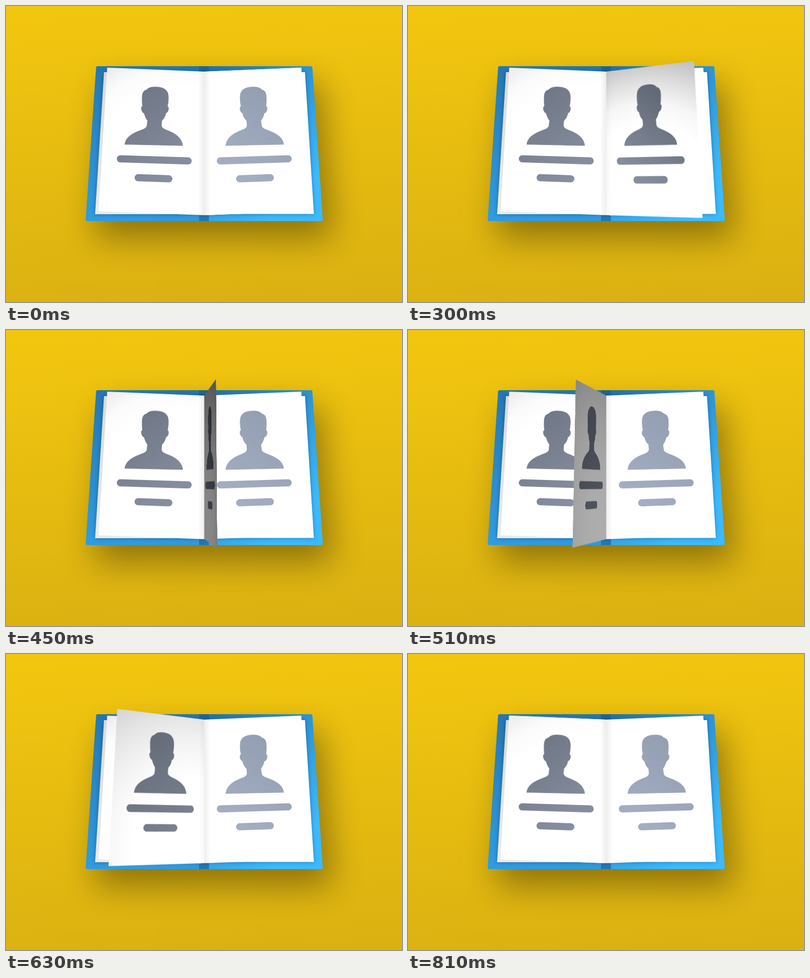
Recreate the animation shown at these times as an HTML page. Size 800 by 600 pixels, loop 0.84 s.

```html
<!DOCTYPE html>
<html lang="en">
<head>
<meta charset="utf-8">
<title>Page turn</title>
<style>
  html, body { margin: 0; width: 100%; height: 100%; overflow: hidden; }
  #stage {
    position: relative; width: 800px; height: 600px; overflow: hidden;
    background: linear-gradient(177deg, #f2c60f 3%, #dab111 97%);
    perspective: 1340px; perspective-origin: 400.5px 276px;
  }
  svg { position: absolute; left: 0; top: 0; width: 800px; height: 600px; overflow: visible; }
  #flip { transform-origin: 400.5px 276px; }
</style>
</head>
<body>
<div id="stage">
  <svg viewBox="0 0 800 600">
    <defs>
      <filter id="soft" x="-40%" y="-50%" width="180%" height="200%"><feGaussianBlur stdDeviation="33"/></filter>
      <filter id="near" x="-10%" y="-10%" width="120%" height="120%"><feGaussianBlur stdDeviation="4"/></filter>
      <linearGradient id="coverL" gradientUnits="userSpaceOnUse" x1="300" y1="122" x2="270" y2="436">
        <stop stop-color="#2476b2"/><stop offset="1" stop-color="#309be1"/>
      </linearGradient>
      <linearGradient id="coverR" gradientUnits="userSpaceOnUse" x1="430" y1="110" x2="640" y2="330">
        <stop stop-color="#2273af"/><stop offset="1" stop-color="#3bbaff"/>
      </linearGradient>
      <linearGradient id="spine" x2="0" y2="1">
        <stop stop-color="#1d6598"/><stop offset="1" stop-color="#2278b1"/>
      </linearGradient>
      <linearGradient id="under" x2="0" y2="1">
        <stop stop-color="#d9d9d9"/><stop offset="1" stop-color="#ebebeb"/>
      </linearGradient>
      <linearGradient id="fold" gradientUnits="userSpaceOnUse" x1="400.5" y1="0" x2="413" y2="0">
        <stop stop-opacity=".07"/><stop offset="1" stop-opacity="0"/>
      </linearGradient>
    </defs>
    <path d="M182 122H619L640 436H161Z" transform="translate(18 34)" opacity=".36" filter="url(#soft)"/>
    <path d="M400 122H185Q182 122 182 125L161 433Q161 436 164 436H400Z" fill="url(#coverL)"/>
    <path d="M400 122H616Q619 122 619 125L640 433Q640 436 637 436H400Z" fill="url(#coverR)"/>
    <path d="M390 122H410V436H390Z" fill="url(#spine)"/>
    <path d="M198 134H604L622 422H180Z" opacity=".3" filter="url(#near)"/>
    <path d="M401 133L198 134L180 422H401Z" fill="url(#under)"/>
    <path d="M400 133L604 134L622 421.5H400Z" fill="#fefefe"/>
    <g id="left" transform="matrix(-1 0 0 1 801 0)"></g>
    <g id="right"></g>
  </svg>
  <svg id="flip" viewBox="0 0 800 600"></svg>
</div>
<script>
const LOOP = 840, STEP = 30, HOLD = 120, START = 93, STOPS = 8;
const INK = [118, 126, 141];
const $ = id => document.getElementById(id);

const HEAD = `M444 283C446 265 462 257 478 251C485 248 487 245 487 241L486 232
  C481 228 479 222 478 217C474 216 472 210 473 206C473 204 474 204 475 204
  C473 195 472 185 474 177C477 167 488 164 500 164C508 164 514 166 517 170
  C524 171 526 178 526 186C526 194 526 199 525 204C528 203 528 208 527 211
  C526 215 524 217 522 217C520 224 518 229 515 232L516 240
  C516 245 518 247 524 250C543 257 559 264 561 280.5Z`;
const SHEET = 'M400.5 133L596.5 125L614 416L400.5 424Z';

function buildPage(id) {
  const stops = n => Array.from({ length: n }, (_, i) => `<stop offset="${i / (n - 1)}"/>`).join('');
  const page = $(id);
  page.innerHTML = `
    <radialGradient id="${id}Paper" gradientUnits="userSpaceOnUse" r="304">${stops(STOPS)}</radialGradient>
    <linearGradient id="${id}Ink" gradientUnits="userSpaceOnUse" x1="560" y1="160" x2="430" y2="350">${stops(2)}</linearGradient>
    <path d="${SHEET}" fill="url(#${id}Paper)"/>
    <path class="fold" d="M400.5 133L413 132.5V423.5L400.5 424Z" fill="url(#fold)"/>
    <g fill="url(#${id}Ink)" stroke="url(#${id}Ink)">
      <path d="${HEAD}" stroke-width=".8"/>
      <path d="M433 314L570 309.7M472 350.3L534 348" stroke-width="14.4" stroke-linecap="round"/>
    </g>`;
  const [paper, ink] = page.querySelectorAll('radialGradient, linearGradient');
  return { paper, ink, fold: page.querySelector('.fold') };
}

// Light falls from its flat value to the edge-on value as the page rises.
// c is the cosine of the turn: 1 flat on the right, -1 flat on the left.
function shade({ paper, ink, fold }, c) {
  const fall = (edge, flat, power) => edge + (flat - edge) * Math.abs(c) ** power;
  const inner = c > 0 ? fall(.5, 1.4, 1.5) : fall(.5, 1.16, 1);
  const outer = c > 0 ? fall(.32, 1.24, 4) : fall(.32, .92, .8);
  const paint = (stop, rgb, b) =>
    stop.setAttribute('stop-color', `rgb(${rgb.map(v => Math.min(255, Math.round(v * b)))})`);

  paper.setAttribute('cx', 465 + 35 * c);
  paper.setAttribute('cy', 400 + 20 * c);
  [...paper.children].forEach((stop, i) => {
    const u = i / (STOPS - 1);
    paint(stop, [255, 255, 255], inner + (outer - inner) * u * u);
  });
  paint(ink.children[0], INK, outer);
  paint(ink.children[1], INK, inner);
  fold.setAttribute('opacity', c ** 4);
}

shade(buildPage('left'), -1);
shade(buildPage('right'), 1);
const flip = buildPage('flip');

function draw() {
  const now = performance.now() % LOOP;
  const t = now < HOLD ? START : Math.floor(now / STEP) * STEP;
  const q = (t - START) / (LOOP - START);
  const angle = Math.PI * q * q * (3 - 2 * q);
  $('flip').style.transform = `rotateY(${-angle}rad)`;
  shade(flip, Math.cos(angle));
  requestAnimationFrame(draw);
}
draw();
</script>
</body>
</html>
```
